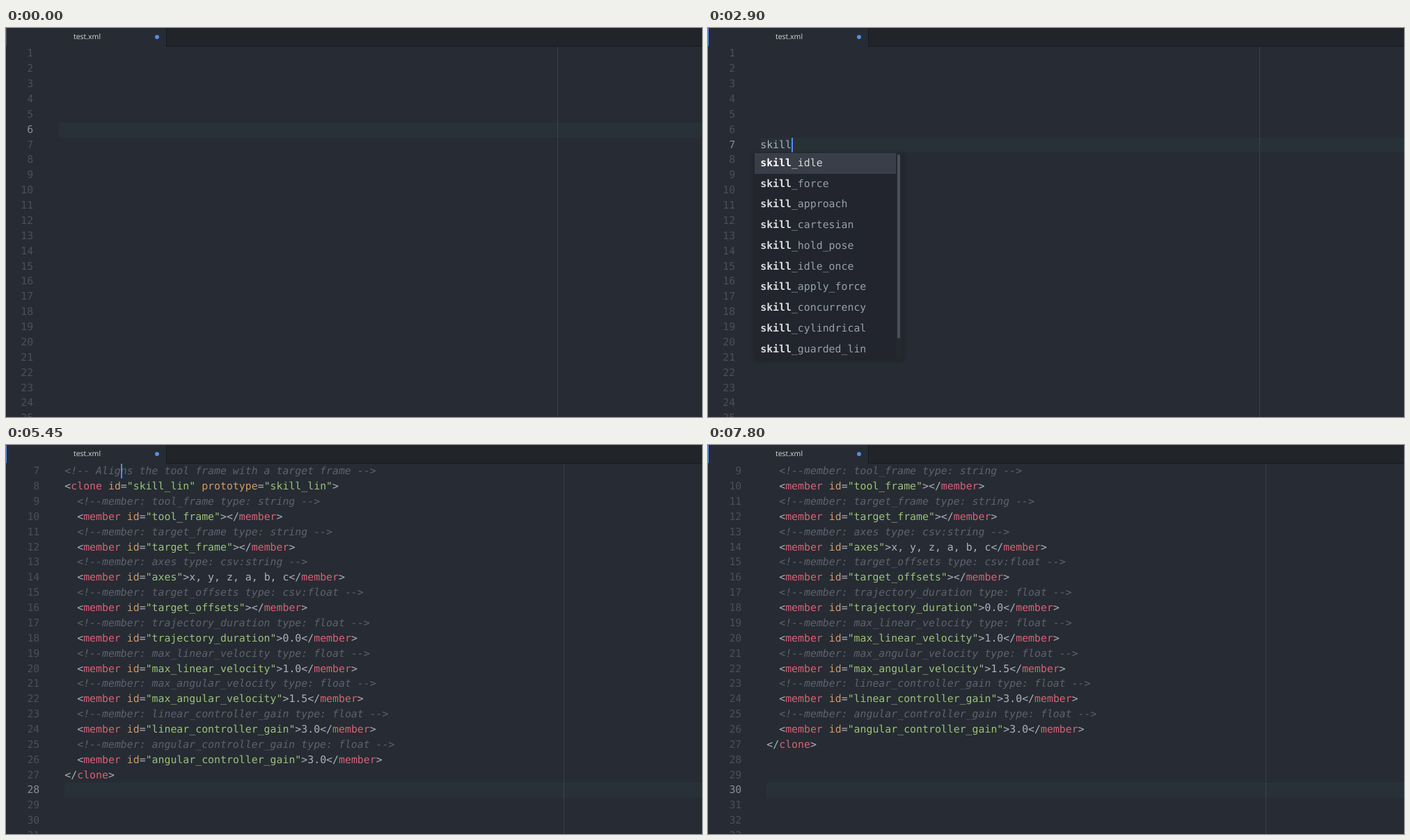
Write an HTML page that moves like this. It is 1000 px wide and 560 px high and loops after 8000 ms.

```html
<!DOCTYPE html>
<html lang="en">
<head>
<meta charset="utf-8">
<title>Editor autocomplete</title>
<style>
  html, body { margin: 0; width: 100%; height: 100%; overflow: hidden; background: #272b33; }
  #stage { position: relative; width: 1000px; height: 560px; overflow: hidden; background: #272b33; }
  #stage div { position: absolute; box-sizing: border-box; }
  #tabs { left: 0; top: 0; width: 1000px; height: 27px; background: #212428; border-bottom: 1px solid #181a1f; }
  #tab { left: 0; top: 0; width: 231px; height: 27px; background: #272b33; border-right: 1px solid #181a1f;
    font: 10.5px/26px "Open Sans", "Noto Sans", sans-serif; color: #d7dae0; text-rendering: geometricPrecision; }
  #title { left: 97px; top: 0; white-space: pre; }
  #dot { left: 213.5px; top: 10px; width: 6px; height: 6px; border-radius: 50%; background: #568cdf; }
  #edge { left: 0; top: 0; width: 1px; height: 26px; }
  #editor { left: 0; top: 27px; width: 1000px; height: 533px; overflow: hidden; }
  #view { left: 0; top: -27px; width: 1000px; height: 560px; color: #abb2bf;
    font: 14.87px/21.87px "DejaVu Sans Mono", monospace; text-rendering: geometricPrecision; white-space: pre; }
  .num { left: 0; text-align: right; color: #4a505c; }
  .num.on { color: #868c97; }
  .row { right: 0; background: #283137; }
  .guide { top: 26px; width: 1px; height: 534px; background: rgba(171, 178, 191, .15); }
  .cursor { width: 2px; height: 21px; background: #528bff; }
  .pop { left: 67px; top: 180px; height: 297px; background: #22252d; box-shadow: 0 1px 6px 1px rgba(0, 0, 0, .24); }
  .track { right: 0; top: 0; width: 9px; height: 297px; background: #25282f; }
  .thumb { right: 3px; top: 2px; width: 4px; height: 265px; border-radius: 2px; background: #4a505d; }
  .item { left: 0; height: 29.74px; line-height: 29.74px; padding-left: 8.2px; color: #9a9fa9; }
  .item b { color: #d9dce2; }
  .item.on { background: #3a3e48; color: #d7dae0; }
  .item.on b { color: #fff; }
  .c { color: #5c6370; font-style: italic; }
  .t { color: #d66375; }
  .a { color: #d19a66; }
  .s { color: #98c379; }
</style>
</head>
<body>
<div id="stage">
  <div id="editor"><div id="view"></div></div>
  <div id="tabs"><div id="tab"><div id="edge"></div><div id="title">test.xml</div><div id="dot"></div></div></div>
</div>
<script>
const LOOP = 8000, CHAR = 8.953, LINE = 21.87, ITEM = 29.74;
const view = document.getElementById('view');
const edge = document.getElementById('edge');

const span = (cls, text) => `<span class="${cls}">${text}</span>`;
const comment = text => span('c', `&lt;!--${text} --&gt;`);
const attr = (name, value) => ` ${span('a', name)}=${span('s', `"${value}"`)}`;
const open = (tag, attrs) => `&lt;${span('t', tag)}${attrs}&gt;`;
const close = tag => `&lt;/${span('t', tag)}&gt;`;
const member = ([name, type, value]) => [
  '  ' + comment(`member: ${name} type: ${type}`),
  '  ' + open('member', attr('id', name)) + value + close('member')
];

const FIRST = 7;
const code = [
  comment(' Aligns the tool frame with a target frame'),
  open('clone', attr('id', 'skill_lin') + attr('prototype', 'skill_lin')),
  ...[
    ['tool_frame', 'string', ''],
    ['target_frame', 'string', ''],
    ['axes', 'csv:string', 'x, y, z, a, b, c'],
    ['target_offsets', 'csv:float', ''],
    ['trajectory_duration', 'float', '0.0'],
    ['max_linear_velocity', 'float', '1.0'],
    ['max_angular_velocity', 'float', '1.5'],
    ['linear_controller_gain', 'float', '3.0'],
    ['angular_controller_gain', 'float', '3.0']
  ].flatMap(member),
  close('clone')
];

// Capitals mark the matched letters after "skill_".
const basic = 'idle force approach cartesian hold_pose idle_once apply_force concurrency cylindrical guarded_lin';
const withL = 'Lin Log_force Log_cartesian guarded_Lin partial_Lin relative_Lin sLide sLide_relative idLe hoLd_pose';
const withLin = 'guarded_LIN partial_LIN relative_LIN cyLINdrical cyLINdrical_tracking cyLINdrical_velocity ' +
  'cyLINdrical_positioning Log_cartesIaN sphericaL_trackINg hoLd_duratIoN';
const list = (words, hit, right) => ({ words: words.split(' '), hit, right });

// Each step changes some fields of the state before it.
const steps = [
  [0, { focus: false, first: 1, line: 6, text: '', pop: null, cursor: null, code: false }],
  [600, { focus: true, line: 7 }],
  [700, { cursor: [7, 0] }],
  [1150, { cursor: null }],
  [1350, { cursor: [7, 0] }],
  [1700, { cursor: null }],
  [1800, { text: 's', cursor: [7, 1] }],
  [1950, { text: 'sk', cursor: [7, 2] }],
  [2300, { text: 'ski', cursor: [7, 3] }],
  [2400, { pop: list(basic, 3, 270) }],
  [2550, { text: 'skil', cursor: [7, 4] }],
  [2700, { pop: list(basic, 4, 270) }],
  [2850, { text: 'skill', cursor: [7, 5], pop: list(basic, 5, 270) }],
  [3050, { text: 'skill_', cursor: [7, 6] }],
  [3250, { pop: list(basic, 6, 282) }],
  [3350, { text: 'skill_l', cursor: [7, 7] }],
  [3500, { text: 'skill_li', cursor: [7, 8], pop: list(withL, 6, 275) }],
  [3750, { text: 'skill_lin', cursor: [7, 9] }],
  [3850, { pop: list(withLin, 6, 356) }],
  [4050, { cursor: null }],
  [4350, { cursor: [7, 9] }],
  [4750, { cursor: null }],
  [5150, { cursor: [7, 9] }],
  [5450, { code: true, first: 7, line: 28, text: '', pop: null }],
  [5500, { cursor: null }],
  [5650, { cursor: [28, 0] }],
  [6050, { cursor: null }],
  [6400, { cursor: [28, 0] }],
  [6900, { cursor: null }],
  [7150, { first: 8, line: 29, cursor: [29, 0] }],
  [7400, { first: 9, line: 30, cursor: [30, 0] }],
  [7800, { cursor: null }]
];
const states = [];
for (const [, change] of steps) states.push({ ...states[states.length - 1], ...change });

const box = (cls, style, body = '') => `<div class="${cls}" style="${style}">${body}</div>`;

function popup({ words, hit, right }) {
  const width = right - 67;
  const label = word => `<b>${'skill_'.slice(0, hit)}</b>${'skill_'.slice(hit)}` +
    word.replace(/[A-Z]+/g, m => `<b>${m.toLowerCase()}</b>`);
  const items = words.map((word, i) =>
    box(i ? 'item' : 'item on', `top:${i * ITEM}px;width:${width}px`, label(word)));
  return box('pop', `width:${width + 9}px`,
    items.join('') + box('track', '') + box('thumb', ''));
}

function render(s) {
  const left = s.code ? 84.3 : 75.2;
  const top = n => (s.code ? 27.2 : 26.4) + (n - s.first) * LINE;
  let html = box('row', `left:${Math.round(left)}px;top:${top(s.line)}px;height:${LINE}px`);
  for (let n = s.first; n < s.first + 25; n++) {
    const on = n === s.line ? ' on' : '';
    const text = s.code ? code[n - FIRST] : n === FIRST && s.text;
    html += box('num' + on, `top:${top(n)}px;width:${left - 36}px`, n);
    if (text) html += box('', `left:${left}px;top:${top(n)}px`, text);
  }
  html += box('guide', `left:${s.code ? 801 : 792}px`);
  if (s.cursor) {
    const [n, col] = s.cursor;
    html += box('cursor', `left:${Math.round(left + col * CHAR)}px;top:${Math.round(top(n) + .2)}px`);
  }
  if (s.pop) html += popup(s.pop);
  view.innerHTML = html;
  edge.style.background = s.focus ? '#568af2' : '#4c515b';
}

let shown = -1;
const start = performance.now();
function tick() {
  const t = (performance.now() - start) % LOOP;
  let i = steps.length - 1;
  while (steps[i][0] > t) i--;
  if (i !== shown) render(states[shown = i]);
  requestAnimationFrame(tick);
}
tick();
</script>
</body>
</html>
```
